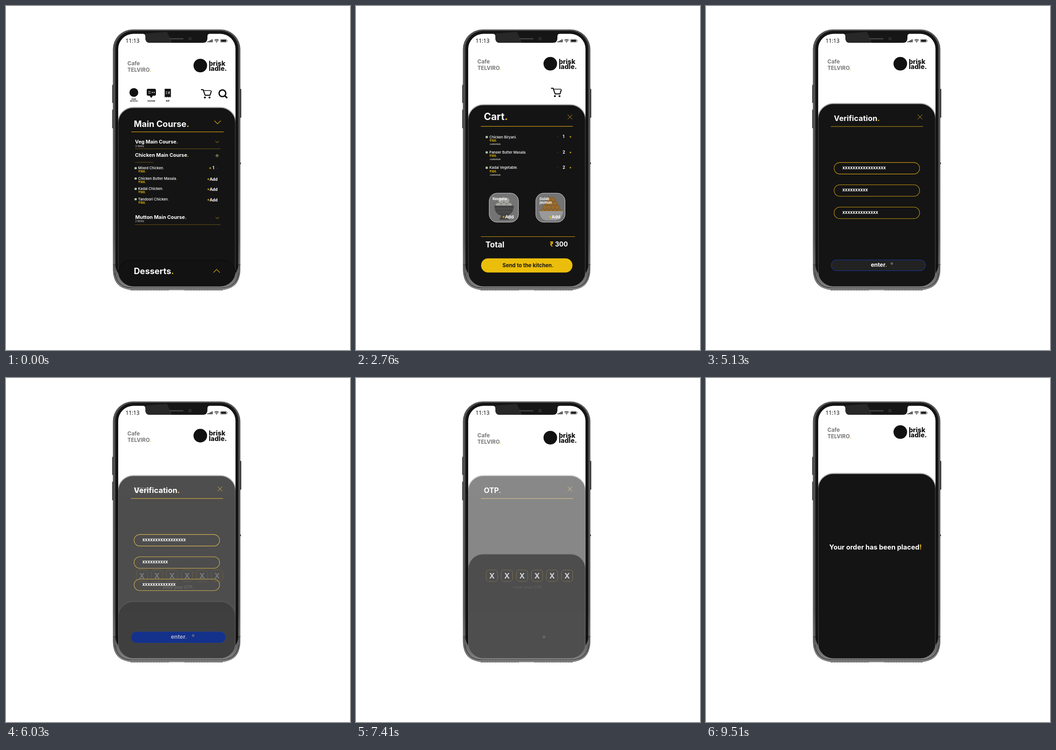
These frames come from a looping animation (748 px wide and 748 px high, 9.54 s). An HTML page:

```html
<!DOCTYPE html>
<html lang="en">
<head>
<meta charset="utf-8">
<style>
  html, body { margin: 0; width: 100%; height: 100%; overflow: hidden; background: #fff; }
  svg { display: block; width: 100vw; height: 100vh; }
  text { font-family: Inter, sans-serif; white-space: pre; }
  .ln { fill: none; stroke: #c99b12; stroke-linecap: round; stroke-linejoin: round; }
</style>
</head>
<body>
<svg id="stage" viewBox="0 0 748 748"></svg>
<script>
const GOLD = '#ecbe0c', DARK = '#141414', LOOP = 9540;

// Text at a baseline; characters in braces turn gold.
const text = (x, y, size, str, fill = '#fff', weight = 700, extra = '') =>
  `<text x="${x}" y="${y}" font-size="${size}" fill="${fill}" font-weight="${weight}" ${extra}>` +
  String(str).replace(/\{(.+?)\}/g, `<tspan fill="${GOLD}">$1</tspan>`) + '</text>';
const group = (id, body) => `<g id="${id}">${body}</g>`;
const rect = (x, y, w, h, r, attrs) =>
  `<rect x="${x}" y="${y}" width="${w}" height="${h}" rx="${r}" ${attrs}/>`;
const line = (d, width = 1, attrs = '') => `<path class="ln" d="${d}" stroke-width="${width}" ${attrs}/>`;
const chevron = (x, y, w, h) => line(`M${x - w} ${y - h / 2}l${w} ${h}l${w} ${-h}`, w > 5 ? 1.3 : 1);
const closeIcon = line('M460.5 236.5l9.5 9.5m0 -9.5l-9.5 9.5', 1);
const panel = (id, top) => group(id,
  rect(244, top, 255, 640, 33, `fill="${DARK}" stroke="#858a87" stroke-width="1.6" filter="url(#soft)"`) +
  rect(244.5, top + 1, 254, 640, 32, `fill="${DARK}"`));
const marker = (x, y) =>
  rect(x, y, 4.4, 4.4, .4, 'fill="#dcefd0"') + rect(x + 1.2, y + 1.2, 2, 2, 1, 'fill="#3f8a35"');

function phone() {
  const button = (x, y, h) => rect(x, y, 4, h, 1.5, 'fill="#333"');
  return button(231, 171, 40) + button(231, 225, 41) + button(507.5, 180, 63) + button(507, 340, 4) +
    rect(232.5, 51, 277, 567, 43, 'fill="url(#rim)"') +
    rect(234.5, 52.5, 273, 564, 41, 'fill="none" stroke="#777" stroke-width=".8"') +
    rect(238, 54, 267, 561, 39, 'fill="#141414"') +
    `<path d="M233 562H509V578Q507 617 466 617H276Q235 617 233 578Z" fill="url(#base)"/>
     <path d="M238 560V566Q240 579 250 588L255 560ZM505 560V566Q503 579 493 588L488 560Z" fill="#111"/>
     <path d="M233 562h5M505 562h5M237 580Q241 613 276 613H466Q502 613 506 580" fill="none" stroke="#333" stroke-width="1.2"/>
     <path d="M271 617.7h83M388 617.7h83" stroke="#444" stroke-width="1.2" stroke-dasharray="5 1"/>`;
}

function notch() {
  const bars = [0, 1, 2, 3].map(i => rect(438 + i * 3, 77 - i * 1.5, 2, 2 + i * 1.5, .4, 'fill="#111"')).join('');
  return `<path d="M298 60Q303 61 303 66V70Q303 80 313 80H428Q438 80 438 70V66Q438 61 443 60Z" fill="#161616"/>
    <path d="M350 56L361 80H313Q303 80 303 70V60Z" fill="#303030" opacity=".7"/>` +
    rect(355, 70, 31, 2.6, 1.3, 'fill="#444"') +
    '<circle cx="400" cy="71" r="3" fill="#222" stroke="#3d3d3d"/>' +
    text(260, 79.6, 11.8, '11:13', '#111', 500, 'style="font-family:Noto Sans,sans-serif"') + bars +
    `<path d="M453.4 74.6q4.6 -4 9.2 0M455.2 76.6q2.8 -2.4 5.6 0" fill="none" stroke="#111" stroke-width="1.3"/>
     <circle cx="458" cy="78.3" r="1"/>` +
    rect(466, 72.3, 14, 6.6, 1.8, 'fill="none" stroke="#555" stroke-width=".8"') +
    rect(467.3, 73.5, 11.4, 4.2, .9, 'fill="#111"') + rect(480.6, 74.4, 1.2, 2.4, .6, 'fill="#555"');
}

const header = group('header',
  text(264, 4, 11.8, 'Cafe', '#777') + text(264, 17.7, 11.5, 'TELVIRO{.}', '#777') +
  '<circle cx="422.5" cy="4.5" r="14.8" fill="#111"/>' +
  text(441, 4.6, 14.3, 'brisk', '#111', 800) + text(441, 16, 14.3, 'ladle.', '#111', 800));

const tools = group('tools',
  '<circle cx="278" cy="188" r="9.6" fill="#111"/>' +
  '<g text-anchor="middle">' + text(278, 204, 4, 'brisk', '#111') + text(278, 208, 4, 'services', '#111') +
  text(316, 207.5, 5.2, 'review', '#111') + text(351.5, 207.5, 5.2, 'bill', '#111') + '</g>' +
  rect(306, 180, 20, 15, 3, 'fill="#111"') +
  `<path d="M311 194h9l-4 6z" fill="#111"/>
   <path d="M309.5 186h5M309.5 189.5h5" stroke="#fff"/>
   <path d="M317 188h2m2 0h2" stroke="#fff" stroke-width="2"/>
   <path d="M345 180h13.5v19l-2.2 -1.7l-2.3 1.7l-2.2 -1.7l-2.3 1.7l-2.2 -1.7l-2.3 1.7z" fill="#111"/>
   <path d="M347 187h4M347 190.5h4" stroke="#fff"/>` + text(352.4, 191.5, 7, '₹') +
  `<circle cx="470.6" cy="189.8" r="7.3" fill="none" stroke="#111" stroke-width="3"/>
   <path d="M476 195.2l5 5" stroke="#111" stroke-width="3.4"/>`);

const cartIcon = group('cartIcon',
  `<path d="M424 181.8h4.5l4.5 12.4h10.5l3.2 -9.5" fill="none" stroke="#111" stroke-width="2.2"/>
   <path d="M430 183.8h16" stroke="#111" stroke-width="1.5"/>
   <circle cx="432.5" cy="199" r="2.1"/><circle cx="442.5" cy="199" r="2.1"/>`);

function menuScene() {
  const dishes = ['Mixed Chicken', 'Chicken Butter Masala', 'Kadai Chicken', 'Tandoori Chicken'];
  const rows = dishes.map((name, i) => {
    const y = 355 + i * 22.5;
    return marker(279.6, y - 4.6) + text(287.3, y, 7.7, name + '{.}', '#fff', 500) +
      text(288, y + 7.2, 6, '₹100.', GOLD) +
      (i ? text(437, y + 2, 8.8, '{+}Add')
         : text(441, y, 8.8, '{+} 1') + text(456.5, y, 8, '-', '#1c3fa8'));
  }).join('');
  return group('menu', panel('menuPanel', 221) +
    text(278, 262.5, 18.5, 'Main Course{.}') + chevron(460, 253, 6.5, 6.5) + line('M273 273.6H473', 1.2) +
    text(280.5, 299.3, 10.8, 'Veg Main Course{.}') + text(281, 306.6, 5.6, '3 items', '#ddd', 400) +
    chevron(459, 295.5, 3.5, 3.5) + line('M281 310.5H466', .8, 'opacity=".6"') +
    text(280.5, 328, 10.9, 'Chicken Main Course{.}') + chevron(459, 324, 3.5, -3.5) +
    line('M281 340H320', .8, 'opacity=".6"') + rows +
    text(281, 463, 10.9, 'Mutton Main Course{.}') + text(281, 470.3, 5.6, '2 items', '#ddd', 400) +
    chevron(459.5, 461, 3.5, 3.5) + line('M281 475.3H466', .8, 'opacity=".6"') +
    rect(244, 552.5, 255, 80, 30, 'fill="#121212" stroke="#0b0b0b" stroke-width="1.5"') +
    text(278, 583, 18.5, 'Desserts{.}') + chevron(458, 576, 6.5, -6.5));
}

function balls(cx, base, r, fill, rows) {
  let out = '';
  for (let row = 0; row < rows; row++)
    for (let i = 0; i < rows + 1 - row; i++)
      out += `<circle cx="${cx + (i - (rows - row) / 2) * r * 1.8}" cy="${base - row * r * 1.7}" r="${r}" fill="${fill}" stroke="#0003" stroke-width=".8"/>`;
  return out;
}

function cartScene() {
  const items = [['Chicken Biryani', 1], ['Paneer Butter Masala', 2], ['Kadai Vegetable', 2]];
  const rows = items.map(([name, count], i) => {
    const y = 287.6 + i * 33.4;
    return marker(282, y - 4.8) + text(290, y, 7.7, name + '{.}', '#fff', 500) +
      text(290.5, y + 7.4, 6, '₹100.', GOLD) + text(291, y + 14.2, 4.8, 'customize', '#eee', 500, 'font-style="italic"') +
      text(437, y - .3, 8, '-', '#1c3fa8') + text(449.3, y - .3, 8.8, count) + text(463.5, y - .3, 8, '{+}');
  }).join('');
  const card = x => rect(x, 407, 63.5, 63, 17, 'fill="#747474"');
  const outline = x => rect(x, 407, 63.5, 63, 17, 'fill="none" stroke="#d5d5d5" stroke-width="1"') +
    text(x + 28, 462, 9.6, '{+}Add');
  return group('cart',
    group('cartSlide', panel('cartPanel', 215) + text(278, 248.4, 21.3, 'Cart{.}') + closeIcon +
      line('M272 261.7H471', 1.2) + rows) +
    card(289.7) + balls(321.5, 434, 6.5, '#a5a5a0', 2) +
    `<path d="M301 434H343Q343 452 328 456L333 465H311L316 456Q301 452 301 434Z" fill="#444"/>
     <path d="M303 441h38M307 448h30" stroke="#707070" stroke-dasharray="2 2"/>` +
    card(391) + balls(424, 446, 5, '#986b2e', 4) +
    '<path d="M398 446H451Q447 464 436 466H412Q401 464 398 446Z" fill="#999"/>' +
    text(297, 422, 7.4, 'Rasgulla{.}') +
    group('cardSlide', text(399, 422, 7.4, 'Gulab') + text(399, 430, 7.4, 'jaumun{.}') + outline(289.7) + outline(391)) +
    group('totalSlide', line('M272 501.5H476', 1) + text(281.5, 524.6, 17, 'Total') + text(421.5, 523.4, 14, '{₹} 300')) +
    rect(272, 548.8, 198.7, 30.6, 15.3, `fill="${GOLD}"`) + text(318.5, 567.5, 11.4, 'Send to the kitchen.', '#161616'));
}

const titled = (title, size) => text(278, 250, size, title) + closeIcon + line('M272 262H471.5', 1.2);

const verifyScene = group('verify', panel('verifyPanel', 212.5) + titled('Verification{.}', 16.6) +
  [0, 1, 2].map(i => rect(278.5, 340.4 + i * 48.4, 186, 25, 12.5, 'fill="none" stroke="#c99b12" stroke-width="1.1"') +
    text(296.5, 355 + i * 48.4, 9.6, '', '#fff', 700, `id="field${i}"`)).join(''));

const enterButton = group('enter', rect(272.5, 552, 204.5, 23.5, 11.75, 'id="enterPill" stroke="#17389e" stroke-width="1.1"') +
  text(358.5, 567, 12.3, 'enter{.}', '#fff', 700, 'id="enterText"'));

const digits = (x0, shape) => Array.from({ length: 6 }, (_, i) => shape(x0 + i * 32.7)).join('');
const otpScene = group('otp', panel('otpPanel', 212.5) + group('otpIn', titled('OTP{.}', 15.9) +
  digits(283.3, x => rect(x, 417.3, 24.5, 25, 6, 'fill="none" stroke="#c99b12" stroke-width="1"'))));
const otpText = group('otpDigits', digits(295.6, x => text(x, 435.5, 16.4, 'X', '#fff', 700, 'text-anchor="middle"'))) +
  group('otpHint', text(341, 458, 8.7, 'enter your OTP.', '#bbb'));

document.getElementById('stage').innerHTML = `<defs>
  <linearGradient id="rim" x1="0" y1="0" x2="0" y2="1"><stop stop-color="#444"/><stop offset=".8" stop-color="#4c4c4c"/><stop offset="1" stop-color="#777"/></linearGradient>
  <linearGradient id="base" x1="0" y1="0" x2="0" y2="1"><stop stop-color="#555"/><stop offset="1" stop-color="#858585"/></linearGradient>
  <filter id="soft" x="-5%" y="-5%" width="110%" height="110%"><feGaussianBlur stdDeviation="1.2"/></filter>
  <clipPath id="screen">${rect(244, 60.5, 255, 549, 33, '')}</clipPath></defs>` +
  phone() + '<g clip-path="url(#screen)">' + rect(244, 60, 255, 550, 0, 'fill="#fff"') +
  header + tools + cartIcon + menuScene() + cartScene() + verifyScene + otpScene + enterButton +
  group('done', panel('donePanel', 208) +
    text(268, 373.3, 14.7, 'Your order has been placed{!}', '#fff', 700, 'id="doneText"')) +
  otpText + '<circle id="cursor" r="1.9" fill="#222" stroke="#bbb" stroke-width=".9"/></g>' + notch();

const el = {};
document.querySelectorAll('svg [id]').forEach(node => el[node.id] = node);
const clamp = v => Math.max(0, Math.min(1, v));
const ramp = (t, start, length) => clamp((t - start) / length);
const ease = (t, start, length = 240) => { const u = ramp(t, start, length); return u * u * (3 - 2 * u); };
const fade = (id, v) => el[id].setAttribute('opacity', v);
const shift = (id, y) => el[id].setAttribute('transform', `translate(0 ${y})`);

function draw(t) {
  const toCart = ease(t, 1242), toVerify = ease(t, 3640), toOtp = ease(t, 5953), toDone = ease(t, 7292);

  shift('header', 125 - 4 * toCart - .5 * toOtp - 7.5 * toDone + 34 * toDone * (1 - toDone));
  fade('tools', 1 - toCart);
  fade('cartIcon', 1 - toVerify);
  shift('cartIcon', -3 * toCart);

  fade('menu', 1 - toCart);
  fade('cart', toCart * (1 - toVerify));
  shift('cartSlide', 345 * (1 - toCart));
  shift('cardSlide', 345 * (1 - toCart));
  shift('totalSlide', 395 * (1 - toCart));

  fade('verify', toVerify * (1 - toOtp));
  shift('verifyPanel', 350 * (1 - toVerify));
  [17, 10, t > 5900 ? 13 : 14].forEach((n, i) =>
    el['field' + i].textContent = 'x'.repeat(Math.round(n * ramp(t, 4000 + i * 310, 300))));

  const press = ramp(t, 5700, 180);
  fade('enter', toVerify * (1 - toOtp * toOtp));
  el.enterPill.setAttribute('fill', `rgb(${34 - 16 * press},${34 + 14 * press},${34 + 110 * press})`);
  fade('enterText', 1 - 1.4 * Math.min(toOtp, .7));

  fade('otp', 1 - toDone);
  fade('otpPanel', toOtp);
  fade('otpIn', toOtp);
  shift('otpPanel', 364 * (1 - toOtp));
  fade('otpDigits', toOtp * (1 - toDone * toDone));
  fade('otpHint', toOtp * (1 - toDone) ** 3);

  fade('done', toDone);
  shift('donePanel', 345 * (1 - toDone));
  fade('doneText', ramp(t, 8130, 500));

  const x = t < 4000 ? 459 : 404 + 3 * ease(t, 5200, 800) + 1.5 * ease(t, 6200, 800);
  const y = t < 4000 ? 326 : 560 + 3 * ease(t, 6200, 800);
  el.cursor.setAttribute('cx', x);
  el.cursor.setAttribute('cy', y);
  fade('cursor', t < 100 || t > 4950 ? 1 - ramp(t, 9090, 300) : 0);
}

function tick() {
  draw(performance.now() % LOOP);
  requestAnimationFrame(tick);
}
tick();
</script>
</body>
</html>
```
